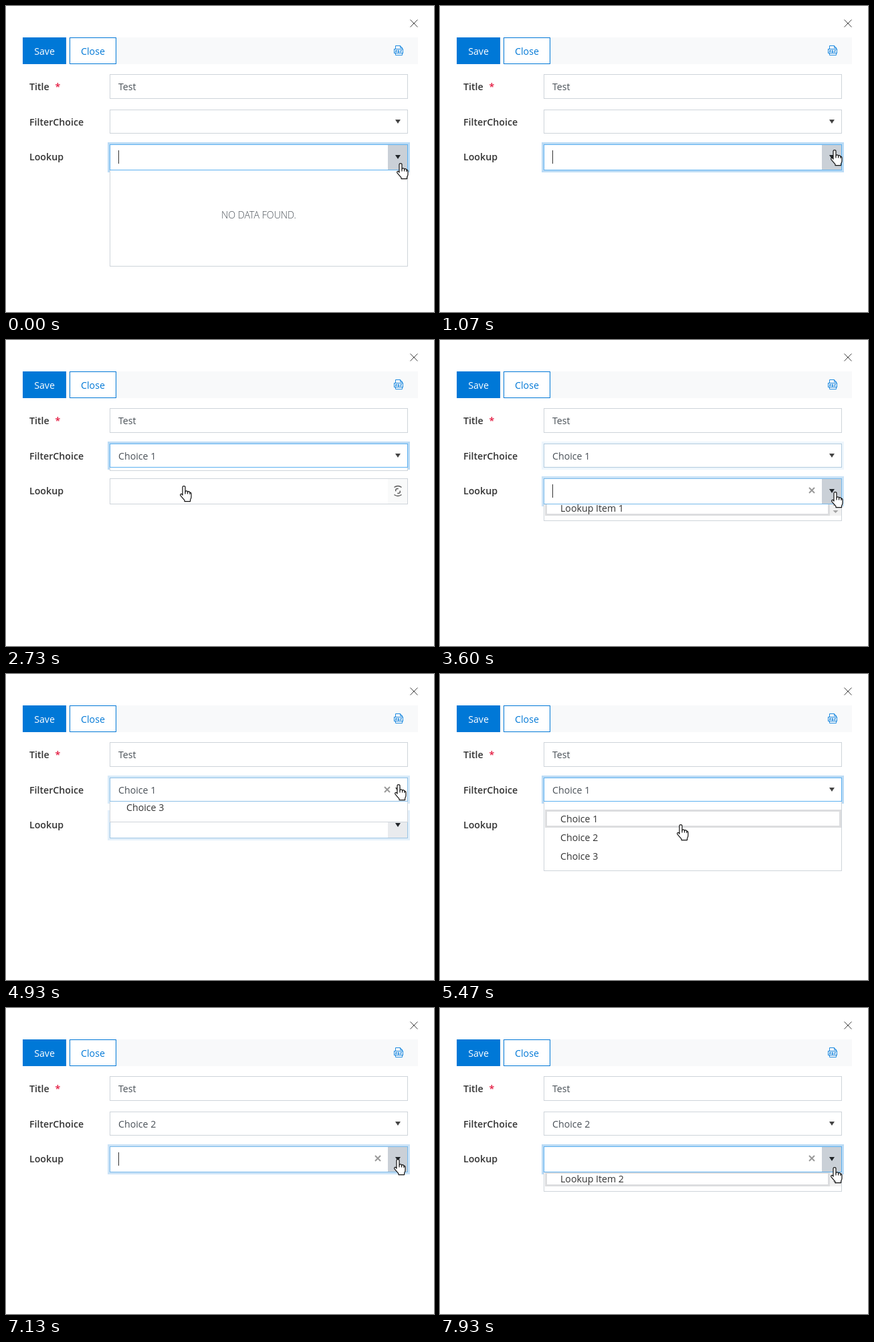
An HTML page for the animation above (8000 ms loop, 640 by 458 pixels).

```html
<!DOCTYPE html>
<html lang="en">
<head>
<meta charset="utf-8">
<title>Cascading lookup form</title>
<style>
  html, body { margin: 0; width: 640px; height: 458px; overflow: hidden; background: #fff; }
  svg { display: block; }
  text { font: 14.2px "Open Sans", "Noto Sans", sans-serif; fill: #495057; }
  .label { font-weight: 600; fill: #333; }
  .item { fill: #333; }
  .field, .panel { fill: #fff; stroke: #ced4da; }
  .glow { fill: none; stroke: #bbdbf5; stroke-width: 3; }
  .focus { fill: none; stroke: #5cb0f0; }
  .outline { fill: none; stroke: #dcdddf; stroke-width: 3; }
  .clear { stroke: #999; stroke-width: 2; fill: none; }
  .line { fill: none; stroke: #555; stroke-width: 1.5; }
</style>
</head>
<body>
<svg width="640" height="458" viewBox="0 0 640 458">
  <path d="M604.5 20.5l11 11m0-11l-11 11" stroke="#444" fill="none"/>
  <rect x="25" y="47" width="591" height="40" fill="#f8f9fa"/>
  <rect x="25" y="47" width="65" height="40" fill="#0078d7"/>
  <text x="57.5" y="73" text-anchor="middle" style="fill:#fff">Save</text>
  <rect x="95.5" y="47.5" width="69" height="39" fill="#fff" stroke="#0078d7"/>
  <text x="130" y="73" text-anchor="middle" style="fill:#0078d7">Close</text>
  <g fill="none" stroke="#1e8ae0">
    <path d="M582.5 64v-4.5h7l3 3V64M582.5 71v2.5h10V71M589.5 59.5v3h3"/>
    <rect x="580.5" y="64.5" width="13" height="6"/>
    <path d="M582.7 69.5v-3h1.5v1.7h-1.5M586.2 66.2v3h1.4v-2.6zM590 69.5v-3h2m-2 1.6h1.6"/>
  </g>

  <text class="label" x="35" y="126">Title</text>
  <text class="label" x="73.5" y="126" style="fill:#e3173e">*</text>
  <text class="label" x="35" y="179">FilterChoice</text>
  <text class="label" x="35" y="231">Lookup</text>

  <rect class="field" x="155.5" y="102.5" width="445" height="36"/>
  <text x="168" y="126">Test</text>

  <rect class="field" x="155.5" y="155.5" width="445" height="35"/>
  <g id="filterFocus">
    <rect class="glow" x="153.5" y="153.5" width="449" height="39"/>
    <rect class="focus" x="155.5" y="155.5" width="445" height="35"/>
  </g>
  <text id="filterValue" x="168" y="179"></text>
  <path id="filterClear" class="clear" d="M566 169l8 8m0-8l-8 8"/>
  <path d="M582 170h8l-4 6z" fill="#444"/>

  <rect class="field" x="155.5" y="207.5" width="445" height="38"/>
  <rect id="button" x="571" y="208" width="29" height="37" fill="#cad0d7"/>
  <g id="lookupFocus">
    <rect class="glow" x="153.5" y="205.5" width="449" height="42"/>
    <rect class="focus" x="155.5" y="207.5" width="445" height="38"/>
  </g>
  <path id="caret" d="M168.5 216v20" stroke="#333"/>
  <path id="lookupClear" class="clear" d="M552 221l8 8m0-8l-8 8"/>
  <path id="arrow" d="M582 223h8l-4 6z" fill="#212529"/>
  <g id="spinner" class="line">
    <path d="M580.5 220.5q5.5-4 11 0M580.5 231.5q5.5 4 11 0"/>
    <path id="innerArcs" d="M583 227q-2-4 3-4.5M589 225q2 4-3 4.5"/>
  </g>

  <svg id="filterPopup" x="155" y="191" width="446">
    <g>
      <rect class="panel" x=".5" y="-.5" width="445" height="104"/>
      <rect class="outline" x="3.5" y="13.5" width="440" height="24"/>
      <text class="item" x="25" y="31">Choice 1</text>
      <text class="item" x="25" y="59">Choice 2</text>
      <text class="item" x="25" y="87">Choice 3</text>
    </g>
  </svg>
  <svg id="emptyPopup" x="155" y="246" width="446">
    <g>
      <rect class="panel" x=".5" y="-.5" width="445" height="158"/>
      <text x="223" y="86" text-anchor="middle" font-weight="300" style="font-weight:300">NO DATA FOUND.</text>
    </g>
  </svg>
  <svg id="lookupPopup" x="155" y="246" width="446">
    <g>
      <rect class="panel" x=".5" y="-.5" width="445" height="42"/>
      <rect x="428" y="12" width="17" height="22" fill="#f1f1f1"/>
      <path d="M432.5 19h8l-4-4zM432.5 26h8l-4 4z" fill="#a3a3a3"/>
      <rect class="outline" x="3.5" y="13.5" width="423" height="19"/>
      <text id="lookupItem" class="item" x="25" y="28"></text>
    </g>
  </svg>

  <g id="cursor" fill="#fff" stroke="#111" stroke-width="1.2" stroke-linejoin="round">
    <path d="M-2 2.2Q-2 .6 0 .6T2 2.2V9Q2.3 7.6 4 7.8T5.6 9.5Q6.4 8.4 7.8 8.8T9 10.6Q11 10 11 12.2V17Q11 19 9.6 21V23.6H1V21.8L-4.6 15.4Q-6 13.4-4.6 12.6T-2 14.2Z"/>
    <path d="M2 9v3.5M5.6 9.5v3M9 10.6v2.4" fill="none"/>
  </g>
</svg>

<script>
const LOOP = 8000, FPS = 15, END = 9000;
const el = id => document.getElementById(id);
const ramp = (t, start, length) => Math.min(1, Math.max(0, (t - start) / length));
const easeOut = x => 1 - (1 - x) ** 1.7;
const smooth = x => x * x * (3 - 2 * x);

// Each span is [start, end] in ms.
const during = (t, ...spans) => spans.some(([a, b]) => t >= a && t < b);
const fade = (t, ...spans) =>
  spans.reduce((sum, [a, b]) => sum + ramp(t, a, 110) - ramp(t, b, 110), 0);
const slide = (t, ...spans) =>
  spans.reduce((sum, [a, b]) => sum + easeOut(ramp(t, a, 200)) - easeOut(ramp(t, b, 100)), 0);

// Pointer stops: time, x, y.
const stops = [
  [910, 590, 235], [1320, 590, 173], [1870, 590, 173], [2330, 212, 217],
  [2670, 212, 217], [2930, 573, 221], [3140, 573, 221], [3330, 591, 227],
  [4390, 591, 227], [4800, 587, 165], [4960, 587, 165], [5200, 587, 201],
  [5670, 209, 241], [5930, 209, 241], [6190, 587, 246], [6610, 587, 246],
  [6870, 586, 226], [7610, 586, 226], [7860, 590, 238]
];

function pointerAt(t) {
  const next = stops.findIndex(stop => stop[0] > t);
  if (next === 0) return stops[0].slice(1);
  if (next < 0) return stops.at(-1).slice(1);
  const [a, x0, y0] = stops[next - 1], [b, x1, y1] = stops[next];
  const k = smooth((t - a) / (b - a));
  return [x0 + (x1 - x0) * k, y0 + (y1 - y0) * k];
}

function setPopup(id, fullHeight, shown) {
  const popup = el(id), height = Math.round(fullHeight * shown);
  popup.style.display = height > 0 ? "" : "none";
  popup.setAttribute("height", height);
  popup.firstElementChild.setAttribute("transform", `translate(0 ${height - fullHeight})`);
}

const show = (id, visible) => { el(id).style.display = visible ? "" : "none"; };
const opacity = (id, value) => { el(id).style.opacity = value; };

function render(t) {
  opacity("filterFocus", fade(t, [1600, 3516], [4870, 6420]));
  opacity("lookupFocus", fade(t, [-500, 1600], [3516, 4870], [7050, END]));
  opacity("button", fade(t, [-500, 1600], [2720, 4870], [6110, 6220], [6650, END]));

  el("filterValue").textContent = t < 2660 ? "" : t < 5925 ? "Choice 1" : "Choice 2";
  el("lookupItem").textContent = t < 6000 ? "Lookup Item 1" : "Lookup Item 2";
  show("filterClear", during(t, [4650, 5150]));
  show("lookupClear", during(t, [2850, 4560], [6650, END]));
  show("caret", during(t, [0, 390], [920, 1430], [3516, 4030], [7050, 7570]));

  const loading = during(t, [2720, 2900], [5990, 6300]);
  show("arrow", !loading);
  show("spinner", loading);
  el("innerArcs").setAttribute("transform", `rotate(${(t - 6200) * 0.36} 586 226)`);

  setPopup("filterPopup", 104, slide(t, [1600, 2650], [4896, 5920]));
  setPopup("emptyPopup", 158, slide(t, [-152, 910]));
  setPopup("lookupPopup", 42, slide(t, [3516, 4380], [7190, 7914]));

  el("cursor").setAttribute("transform", `translate(${pointerAt(t).map(Math.round)})`);
}

function tick() {
  const t = performance.now() % LOOP;
  render(Math.floor(t * FPS / 1000 + 0.1) * 1000 / FPS);
  requestAnimationFrame(tick);
}
tick();
</script>
</body>
</html>
```
